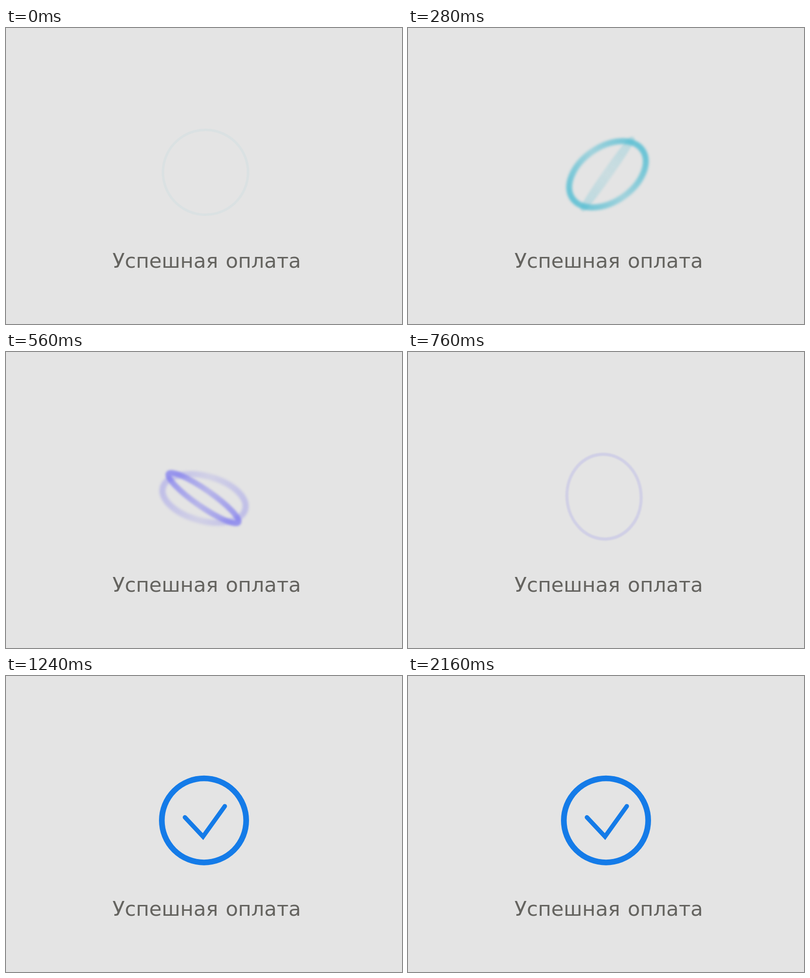
Write an HTML page with a canvas that moves like this. It is 800 px wide and 600 px high and loops after 2.24 s.

```html
<!DOCTYPE html>
<html lang="ru">
<head>
<meta charset="utf-8">
<style>
  html, body { margin: 0; width: 100%; height: 100%; overflow: hidden; background: #e4e4e4; }
  canvas { display: block; }
</style>
</head>
<body>
<canvas id="stage" width="800" height="600"></canvas>
<script>
const ctx = document.getElementById('stage').getContext('2d');
const LOOP = 2240, STEP = 40, SPIN_END = 800, LAG = 80, RADIUS = 86;
const PAPER = '#e4e4e4', BLUE = '#147be8', INK = '#64635f';

const progress = (t, from, to) => Math.min(1, Math.max(0, (t - from) / (to - from)));
const mix = (a, b, p) => a + (b - a) * p;
const radians = degrees => degrees * Math.PI / 180;

// A circle turning in space: it swells, shifts from teal to violet and fades
function spinningRing(t, strength) {
  const swell = Math.sin(Math.PI * t / SPIN_END);
  const violet = progress(t, 320, 440);
  const axis = radians(0.25 * t - 105);
  const tilt = radians(Math.min(180, 201 - 0.54 * t));
  const color = a => `hsla(${mix(190, 242, violet)}, ${mix(60, 80, violet)}%, ${mix(55, 70, violet)}%, ${a})`;

  // Denser at both ends of the turning axis
  const shade = ctx.createLinearGradient(-RADIUS, 0, RADIUS, 0);
  shade.addColorStop(0, color(1));
  shade.addColorStop(0.5, color(1 - 0.5 * swell));
  shade.addColorStop(1, color(1));

  ctx.save();
  ctx.translate(403 - 7 * progress(t, 280, 760), 292.5 + 4.5 * swell);
  ctx.rotate(axis);
  ctx.globalAlpha = strength * (0.06 + 0.8 * swell);
  ctx.filter = `blur(${0.5 + 2.2 * swell}px)`;
  ctx.strokeStyle = shade;
  ctx.lineWidth = 5 + 8 * swell;
  ctx.beginPath();
  ctx.ellipse(0, 0, RADIUS, RADIUS * Math.abs(Math.cos(tilt)), 0, 0, 2 * Math.PI);
  ctx.stroke();
  ctx.restore();
}

function badge(t) {
  ctx.save();
  ctx.strokeStyle = BLUE;
  ctx.globalAlpha = progress(t, 780, 1000);
  ctx.lineWidth = 11.5;
  ctx.beginPath();
  ctx.arc(400, 292.7, 85.2, 0, 2 * Math.PI);
  ctx.stroke();

  const down = progress(t, 900, 990), up = progress(t, 990, 1120);
  if (down > 0) {
    ctx.globalAlpha = 1;
    ctx.lineWidth = 9;
    ctx.lineCap = 'round';
    ctx.beginPath();
    ctx.moveTo(361.5, 286.5);
    ctx.lineTo(mix(361.5, 398, down), mix(286.5, 325.5, down));
    if (up > 0) ctx.lineTo(mix(398, 442, up), mix(325.5, 264, up));
    ctx.stroke();
  }
  ctx.restore();
}

function caption() {
  ctx.fillStyle = INK;
  ctx.font = '41px "DejaVu Sans", sans-serif';
  ctx.wordSpacing = '2px';
  ctx.fillText('Успешная оплата', 215, 486);
}

function draw(now) {
  const t = Math.floor(now % LOOP / STEP) * STEP;
  ctx.fillStyle = PAPER;
  ctx.fillRect(0, 0, 800, 600);
  if (t >= LAG && t < 600) spinningRing(t - LAG, 0.4);
  if (t < SPIN_END) spinningRing(t, 1);
  badge(t);
  caption();
}

const start = performance.now();
function tick() {
  draw(performance.now() - start);
  requestAnimationFrame(tick);
}
tick();
</script>
</body>
</html>
```
